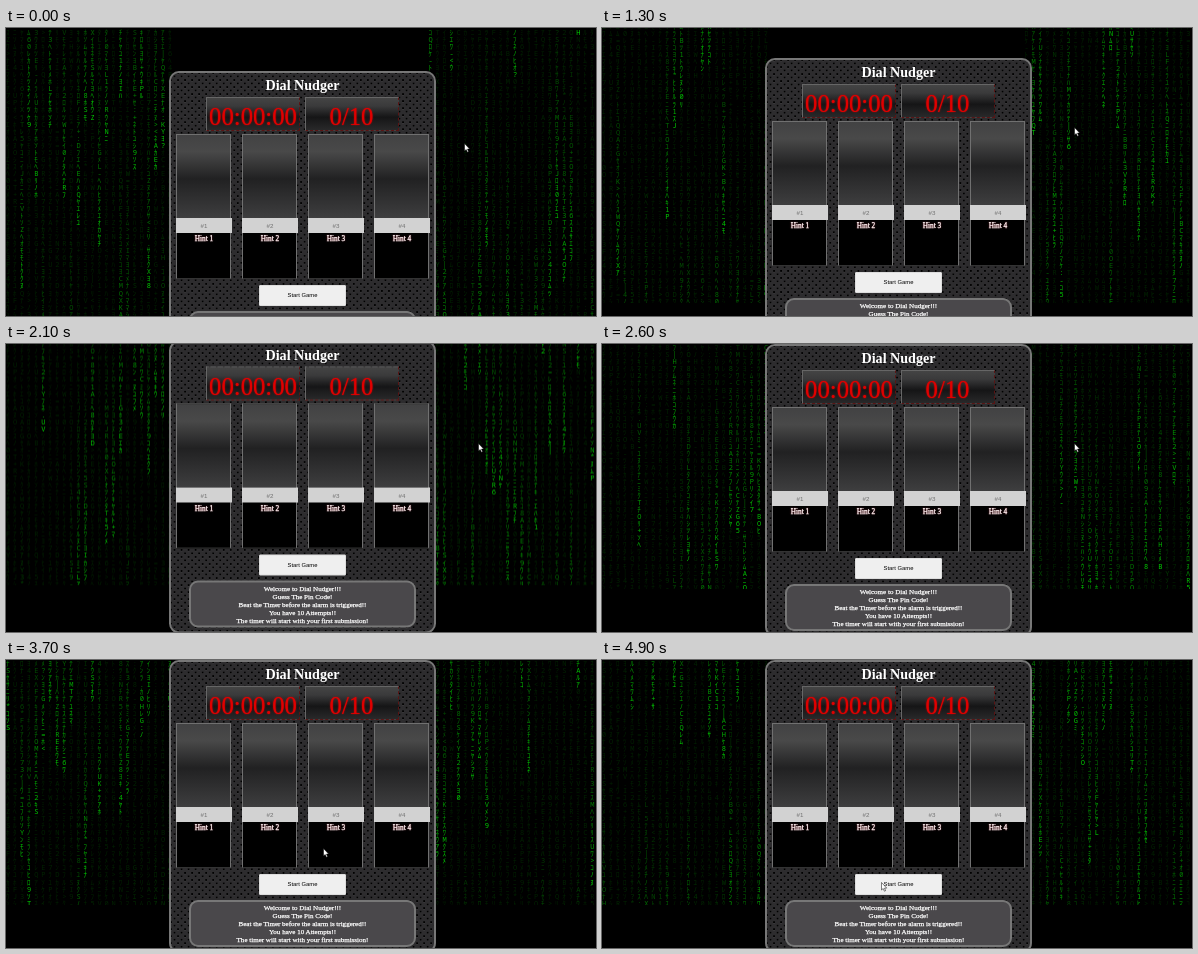
An HTML page with a canvas for the animation above (5000 ms loop, 590x288 px).

```html
<!DOCTYPE html>
<html lang="en">
<head>
<meta charset="utf-8">
<style>
html, body { margin: 0; width: 100%; height: 100%; overflow: hidden; background: #000; }
#stage { position: relative; width: 590px; height: 288px; overflow: hidden; font: 7.04px/8px "Liberation Serif", Times, serif; color: #fff; text-align: center; }
#stage * { position: absolute; box-sizing: border-box; }
#page { left: 0; top: 0; width: 590px; height: 338px; }
#rain { left: 0; top: 0; }
#panel {
  left: 163px; top: 42.5px; width: 267px; height: 293.5px;
  border: 2px solid #777; border-radius: 10px;
  background:
    radial-gradient(#000 17%, transparent 25%) 0 0,
    radial-gradient(#000 17%, transparent 25%) 3.52px 3.52px,
    radial-gradient(#ffffff1a 15%, transparent 22%) 0 .5px,
    radial-gradient(#ffffff1a 15%, transparent 22%) 3.52px 4px,
    #2d2c2e;
  background-size: 7.04px 7.04px;
}
#title { left: 163px; top: 49px; width: 267px; font-weight: bold; font-size: 14.08px; line-height: 16px; }
.led {
  top: 69px; width: 94px; height: 34px; font-size: 24.7px; line-height: 37px; color: #e00000;
  border: 1px solid #666; border-right: 1px dashed #5a1414; border-bottom: 1px dashed #5a1414;
  background: linear-gradient(#444, #3a3a3b 25%, #151516 60%, #29292a); text-shadow: 0 0 1.5px #d00;
}
.col { top: 106px; width: 55px; height: 145px; background: #000; border: 1px solid #707070; border-bottom-color: #333; }
.glass { left: 0; top: 0; width: 53px; height: 83px; background: linear-gradient(#424243, #494949 20%, #212122 53%, #3e3e3f); }
.pin { left: -1px; top: 83px; width: 56px; height: 15px; background: #d2d2d2; color: #707070; font: 6.2px/15px "Liberation Sans", Arial, sans-serif; }
.hint { left: 0; top: 100px; width: 54px; font-size: 7.3px; color: #fff2f2; text-shadow: 0 0 1.5px #e05060; }
.hint, #info { -webkit-text-stroke: .25px #fff; }
#start { left: 253px; top: 257px; width: 87px; height: 21px; background: #efefef; border: 1px solid #ddd; border-radius: 1px; color: #000; font: 5.87px/19px "Liberation Sans", Arial, sans-serif; }
#info { left: 183px; top: 283px; width: 227px; height: 47px; padding-top: 2px; border: 2px solid #777; border-radius: 9px; background: #4a484b; white-space: pre-line; }
#cursor { left: 0; top: 0; }
</style>
</head>
<body>
<div id="stage">
  <div id="page">
    <canvas id="rain" width="590" height="288"></canvas>
    <div id="panel"></div>
    <div id="title">Dial Nudger</div>
    <div class="led" style="left:200px">00:00:00</div>
    <div class="led" style="left:298.5px">0/10</div>
    <div id="start">Start Game</div>
    <div id="info">Welcome to Dial Nudger!!!
Guess The Pin Code!
Beat the Timer before the alarm is triggered!!
You have 10 Attempts!!
The timer will start with your first submission!</div>
  </div>
  <svg id="cursor" width="8" height="12"><path d="M.5 .5V8L2.2 6.5 3.4 9.2 4.6 8.7 3.5 6.1H5.7Z" fill="#fff" stroke="#000" stroke-width=".5"/></svg>
</div>
<script>
const LOOP = 5000, FRAME = 100, TICK = 30, CELL = 7.04, ROWS = 41, COLS = 84;
const $ = id => document.getElementById(id);
const ctx = $('rain').getContext('2d');
const kana = 'ｱｲｳｴｵｶｷｸｹｺｻｼｽｾｿﾀﾁﾂﾃﾄﾅﾆﾇﾈﾉﾊﾋﾌﾍﾎﾏﾐﾑﾒﾓﾔﾕﾖﾗﾘﾙﾚﾛﾜﾝ';
const glyphs = kana + kana + kana + ':.=*+-<>?|ABCDEFGHIJKLMNOPQRSTUVWXYZ0123456789';

const scrollKeys = [[0, 0], [1200, 0], [1300, 13], [1500, 50], [1900, 50], [2300, 43]];
const mouseKeys = [[0, 458, 115], [600, 472, 99], [3000, 472, 99], [3700, 317, 188], [4300, 279, 222]];

for (let i = 0; i < 4; i++)
  $('page').insertAdjacentHTML('beforeend',
    `<div class="col" style="left:${170 + 66 * i}px"><div class="glass"></div>` +
    `<div class="pin">#${i + 1}</div><div class="hint">Hint ${i + 1}</div></div>`);

function rand(a, b) {
  let h = Math.imul(a + 11, 0x9E3779B1) ^ Math.imul(b + 977, 0x85EBCA6B);
  h = Math.imul(h ^ h >>> 15, 0x2C1B3C6D);
  h = Math.imul(h ^ h >>> 13, 0x297A2D39);
  return ((h ^ h >>> 16) >>> 0) / 4294967296;
}

// Start ticks of the drops in each column; the wait below the edge is geometric.
const drops = Array.from({ length: COLS }, (_, c) => {
  const starts = [];
  let s = -260 + Math.floor(rand(c, 5000) * 80);
  for (let n = 0; s < LOOP / TICK; n++) {
    starts.push(s);
    s += ROWS + Math.floor(Math.log(1 - rand(c, 6000 + n)) / Math.log(0.975));
  }
  return starts.reverse();
});

function track(keys, t) {
  const i = keys.findIndex(k => k[0] > t);
  if (i < 0) return keys[keys.length - 1].slice(1);
  const a = keys[i - 1], b = keys[i], f = (t - a[0]) / (b[0] - a[0]);
  return a.slice(1).map((v, j) => v + (b[j + 1] - v) * f);
}

function drawRain(tick) {
  ctx.globalAlpha = 1;
  ctx.fillStyle = '#000';
  ctx.fillRect(0, 0, 590, 288);
  ctx.fillStyle = '#0f0';
  ctx.font = CELL + 'px "Noto Sans Mono", "Noto Sans CJK JP", monospace';
  for (let c = 0; c < COLS; c++) {
    const x = c * CELL;
    if (x > 166 && x < 420) continue;
    for (let r = 1; r <= ROWS; r++) {
      const start = drops[c].find(s => s + r <= tick);
      if (start === undefined) continue;
      const born = start + r;
      ctx.globalAlpha = Math.max(0.13, 0.8 * 0.95 ** (tick - born));
      ctx.fillText(glyphs[Math.floor(rand(c, born) * glyphs.length)], x, r * CELL);
    }
  }
}

let last = -1;
function draw(now) {
  const t = Math.floor(now % LOOP / FRAME) * FRAME;
  if (t !== last) {
    last = t;
    drawRain(Math.floor(t / TICK));
    $('page').style.transform = `translateY(${-track(scrollKeys, t)[0]}px)`;
    const [x, y] = track(mouseKeys, t);
    $('cursor').style.transform = `translate(${x}px, ${y}px)`;
  }
  requestAnimationFrame(draw);
}
draw(performance.now());
</script>
</body>
</html>
```
